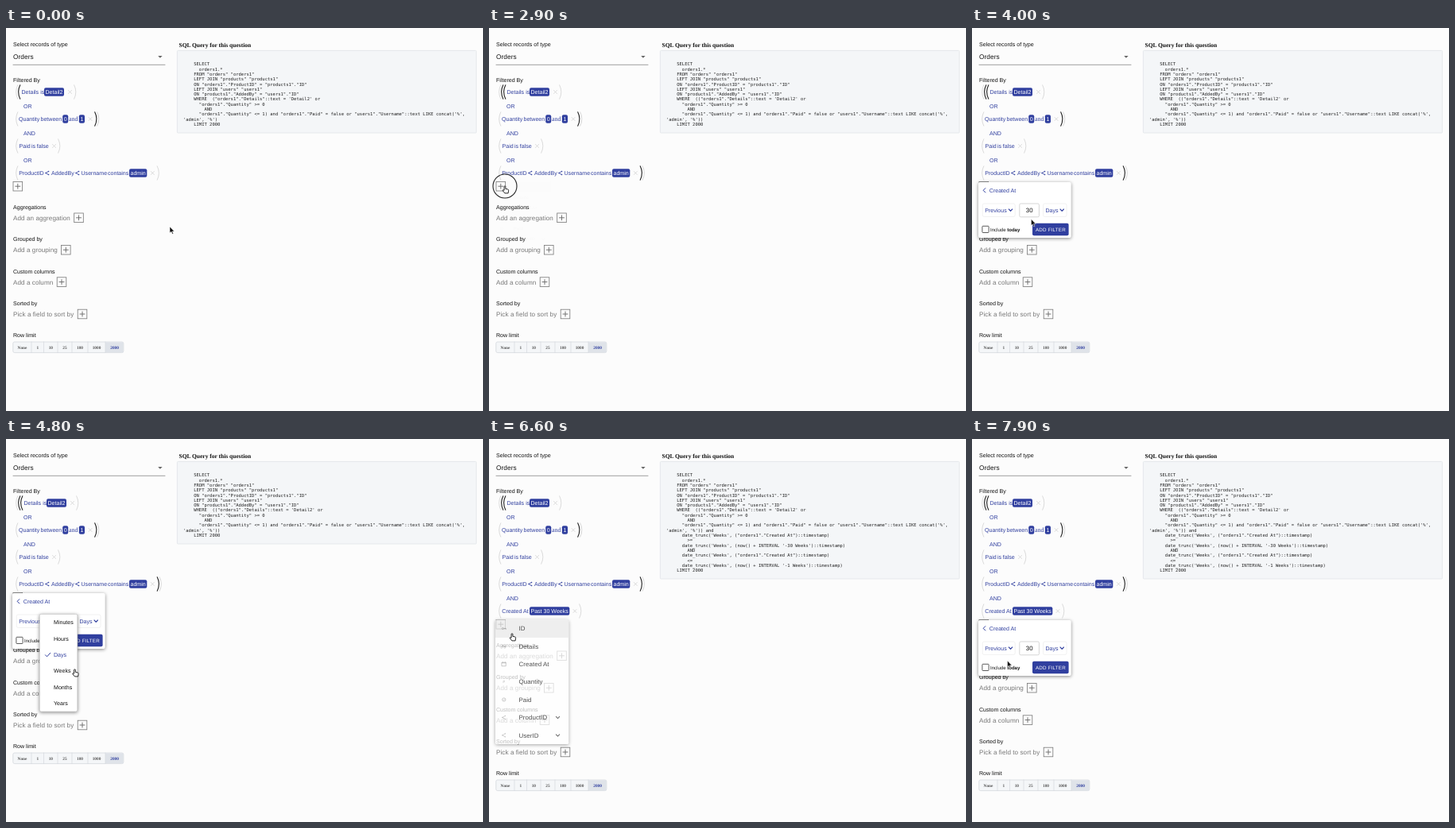
Recreate the animation shown at these times as an HTML page. Size 600 by 482 pixels, loop 8 s.

```html
<!DOCTYPE html>
<html lang="en">
<head>
<meta charset="utf-8">
<title>Query builder</title>
<style>
html, body { margin: 0; width: 100%; height: 100%; overflow: hidden; background: #fcfcfc; }
svg { display: block; width: 600px; height: 482px; }
text { font-family: "Liberation Sans", Arial, sans-serif; white-space: pre; text-rendering: geometricPrecision; }
.serif { font-family: "Liberation Serif", Times, serif; }
.mono { font-family: "DejaVu Sans Mono", monospace; }
.bold { font-weight: bold; }
.mid { text-anchor: middle; }
.body { letter-spacing: .0094em; }
.caps { letter-spacing: .03em; }
.paper { filter: drop-shadow(0 1.5px 2px #0007); }
.line { fill: none; stroke-linecap: round; stroke-linejoin: round; }
</style>
</head>
<body>
<svg id="stage" viewBox="0 0 600 482"></svg>
<script>
const LOOP = 8000, INDIGO = '#303f9f', INK = '#111', GREY = '#777', ROW = 23.15;
const stage = document.getElementById('stage');

// Moments at which the interface changes
const AT = { open: 1000, close: 2200, menu: 2900, panel: 3680, units: 4420, weeks: 5050,
  add: 5720, row: 5850, menu2: 6480, panel2: 7330 };

// Pointer stops: time, x, y
const PATH = [[0, 206, 250], [200, 206, 250], [850, 17, 79], [1300, 17, 79], [1900, 176, 184],
  [2050, 190, 183], [2350, 190, 183], [2780, 20, 199], [3000, 20, 199], [3400, 51, 245],
  [3550, 53, 249], [3800, 53, 249], [4250, 104, 229], [4480, 104, 229], [4800, 86.5, 290],
  [5100, 86.5, 290], [5500, 99.5, 254.5], [5800, 99.5, 254.5], [6350, 15, 232],
  [6500, 15, 232], [6600, 29, 245], [7050, 44.5, 279], [LOOP, 44.5, 279]];
const HAND = [[700, 1400], [1800, 2350], [2700, 3850], [4150, 5150], [5400, 5900], [6250, 7450]];
// Click rings: time, radius
const CLICKS = [[980, 8], [2130, 15], [2870, 15], [3600, 15], [4350, 15], [4980, 15], [5540, 15], [6380, 15], [7230, 15]];

const within = (t, list) => list.some(([a, b]) => t >= a && t < b);
const easeOut = p => 1 - (1 - Math.min(1, Math.max(0, p))) ** 2;

function pointer(t) {
  const i = Math.max(1, PATH.findIndex(p => p[0] >= t));
  const [a, x, y] = PATH[i - 1], [b, u, v] = PATH[i];
  let p = Math.max(0, (t - a) / (b - a));
  p = p * p * (3 - 2 * p);
  return [x + (u - x) * p, y + (v - y) * p];
}

// Drawing helpers; text is placed by its middle height
const esc = s => s.replace(/&/g, '&amp;').replace(/</g, '&lt;');
const text = (x, y, s, size = 7.07, fill = INK, cls = '') =>
  `<text x="${x}" y="${y + size * .36}" font-size="${size}" fill="${fill}" class="${cls}">${esc(s)}</text>`;
const rect = (x, y, w, h, fill, stroke = 'none', r = 0, cls = '') =>
  `<rect x="${x}" y="${y}" width="${w}" height="${h}" rx="${r}" fill="${fill}" stroke="${stroke}" stroke-width=".8" class="${cls}"/>`;
const line = (d, stroke, w = 1) => `<path class="line" d="${d}" stroke="${stroke}" stroke-width="${w}"/>`;
const paren = (x, y, dir, dark) =>
  line(`M${x + 1.3 * dir} ${y - 8.7}q${-4.4 * dir} 8.7 0 17.4`, dark ? '#222' : '#ccc', dark ? 1.1 : .7);
const cross = (x, y) => line(`M${x - 2} ${y - 2}l4 4m0-4l-4 4`, '#ccc', .7);
const plus = (x, y) => rect(x - 5.8, y - 5.8, 11.6, 11.6, 'none', GREY) +
  line(`M${x - 3} ${y}h6m-3-3v6`, '#666', .9);
const chip = (x, y, w, s) => rect(x, y - 5.3, w, 10.6, INDIGO, 'none', 2) +
  text(x + w / 2, y, s, 7.07, '#fff', 'mid');
const share = (x, y, color, w = .8) => line(`M${x + 4} ${y - 2}l-3.5 2l3.5 2`, color, w) +
  [[4, -2], [.5, 0], [4, 2]].map(([a, b]) => `<circle cx="${x + a}" cy="${y + b}" r="${w}" fill="${color}"/>`).join('');
const down = (x, y, color = INK) => line(`M${x - 2.2} ${y - 1}l2.2 2.3l2.2-2.3`, color, 1.1);
const blue = (x, y, s) => text(x, y, s, 7.07, INDIGO);

function filters(t) {
  const s = t >= AT.open ? 3 : 0, closed = t >= AT.close, added = t >= AT.row;
  let out = paren(13.5, 80.5, 1) + paren(16.5, 80.5, 1, true) + (s ? paren(19.5, 80.5, 1, true) : '') +
    blue(19.5 + s, 80.5, 'Details') + blue(43.3 + s, 80.5, 'is') + chip(48 + s, 80.5, 25, 'Detail2') +
    cross(80.5 + s, 80.5) + paren(87 + s, 80.5, -1);
  out += paren(13.5, 114.5, 1) + blue(16, 114.5, 'Quantity') + blue(43.5, 114.5, 'between') +
    chip(71.2, 114.5, 7, '0') + text(79, 114.5, 'and', 8, INDIGO, 'serif') + chip(91.8, 114.5, 7.2, '1') +
    cross(106, 114.5) + paren(113, 114.5, -1, true) + paren(116, 114.5, -1);
  out += paren(13.5, 148.5, 1) + blue(16.5, 148.5, 'Paid') + blue(32, 148.5, 'is') +
    blue(38.7, 148.5, 'false') + cross(60.5, 148.5) + paren(67, 148.5, -1);
  out += paren(13.5, 182.5, 1) + blue(16.3, 182.5, 'ProductID') + share(49.5, 182.5, INDIGO) +
    blue(57, 182.5, 'AddedBy') + share(87.5, 182.5, INDIGO) + blue(94.5, 182.5, 'Username') +
    blue(128, 182.5, 'contains') + chip(155, 182.5, 22.3, 'admin') + cross(184.3, 182.5) +
    (closed ? paren(191.5, 182.5, -1, true) : '') + paren(closed ? 194.5 : 191.5, 182.5, -1);
  out += ['OR', 'AND', 'OR'].map((w, i) => blue(22, 98.5 + 34 * i, w)).join('');
  if (added) out += blue(22, 200.5, 'AND') + paren(13.5, 216.5, 1) + blue(16.3, 216.5, 'Created At') +
    chip(51, 216.5, 50.3, 'Past 30 Weeks') + cross(108, 216.5) + paren(115, 216.5, -1);
  return out;
}

function sections() {
  const list = [['Aggregations', 'Add an aggregation', 91.5], ['Grouped by', 'Add a grouping', 75.3],
    ['Custom columns', 'Add a column', 70], ['Sorted by', 'Pick a field to sort by', 96]];
  let out = plus(14.8, 199.2) + list.map(([head, hint, x], i) => {
    const y = 225.2 + 40.4 * i;
    return text(9, y, head) + text(9, y + 13.6, hint, 8.08, GREY, 'body') + plus(x, y + 13.6);
  }).join('');
  out += text(9, 386.6, 'Row limit') + rect(8.8, 395, 139, 13.6, '#f4f6f8', '#d5d9de', 2) +
    rect(125, 395.4, 22.4, 12.8, '#dfe3e9');
  out += [32, 47.5, 65, 83, 103, 125].map(x => line(`M${x} 395v13.6`, '#d5d9de', .7)).join('');
  const mids = [20.5, 39.8, 56.3, 74, 93, 114, 136.6];
  return out + ['None', '1', '10', '25', '100', '1000', '2000'].map((s, i) =>
    text(mids[i], 401.8, s, 5.3, i === 6 ? INDIGO : '#555', 'serif bold mid')).join('');
}

function sql(t) {
  const added = t >= AT.row, end = t >= AT.close ? "'admin', '%'))" : "'admin', '%')";
  const range = (op, n) => [`      date_trunc('Weeks', ("orders1"."Created At")::timestamp)`, `        ${op}`,
    `      date_trunc('Weeks', (now() + INTERVAL '-${n} Weeks')::timestamp)`];
  const lines = ['    SELECT', '      orders1.*', '    FROM "orders" "orders1"',
    '    LEFT JOIN "products" "products1"', '    ON "orders1"."ProductID" = "products1"."ID"',
    '    LEFT JOIN "users" "users1"', '    ON "products1"."AddedBy" = "users1"."ID"',
    `    WHERE  ${t >= AT.open ? '((' : '('}"orders1"."Details"::text = 'Detail2' or`,
    '      "orders1"."Quantity" >= 0', '        AND',
    `      "orders1"."Quantity" <= 1) and "orders1"."Paid" = false or "users1"."Username"::text LIKE concat('%',`,
    ...(added ? [end + ' and', ...range('>=', 30), '        AND', ...range('<=', 1)] : [end]),
    '    LIMIT 2000'];
  return text(217.5, 21, 'SQL Query for this question', 7.5, INK, 'serif bold') +
    rect(215.4, 28.4, 376.2, added ? 147.6 : 103.6, '#f4f6f8', '#e0e4e8', 1) +
    lines.map((s, i) => text(223, 45.3 + 6.31 * i, s, 5.51, '#222', 'mono')).join('');
}

function menuIcon(i, y) {
  const c = '#999';
  return [
    `<circle cx="17.5" cy="${y}" r="1.1" fill="none" stroke="${c}" stroke-width=".8"/>` + line(`M18.7 ${y}h3v1`, c, .8),
    text(16, y, 'Aa', 4.6, c),
    line(`M16.5 ${y - 2}h5v4.6h-5zM16.5 ${y - 1.5}h5m-4-1.2v.6m3-.6v.6`, c, .7),
    text(17.5, y, '#', 5, c),
    `<circle cx="19" cy="${y}" r="2.2" fill="none" stroke="${c}" stroke-width=".7"/>` + line(`M18 ${y}l.8.8l1.4-1.5`, c, .5),
    share(16.5, y, c, .6), share(16.5, y, c, .6)][i];
}

function menu(t, start, dy) {
  const p = (t - start) / 250, q = easeOut(p / .666), top = 193.6 + dy;
  const [x, y] = pointer(t - 100), hot = x > 8 && x < 102 ? Math.floor((y - top) / ROW) : -1;
  const names = ['ID', 'Details', 'Created At', 'Quantity', 'Paid', 'ProductID', 'UserID'];
  const body = rect(8, top, 94, 161.8, '#fff', 'none', 2, 'paper') +
    names.map((s, i) => {
      const mid = top + 11.2 + ROW * i;
      return (i === hot ? rect(8, top + ROW * i, 94, ROW, '#e9e9e9') : '') + menuIcon(i, mid) +
        text(38, mid, s, 8.08, INK, 'body') + (i > 4 ? down(88, mid, '#444') : '');
    }).join('');
  const scale = `translate(8 ${top}) scale(${.75 + .25 * q} ${.5625 + .4375 * q}) translate(-8 ${-top})`;
  return `<g opacity="${easeOut(p)}" transform="${scale}">${body}</g>`;
}

function panel(dy, weeks, opacity = 1) {
  const w = weeks ? 5.3 : 0;
  return `<g opacity="${opacity}" transform="translate(0 ${dy})">` +
    rect(8, 194, 116.7 + w, 70, '#fff', 'none', 2, 'paper') +
    line('M16.8 201.6l-2.6 2.7l2.6 2.7', INDIGO) + blue(21.8, 204.4, 'Created At') +
    rect(13.2, 221, 41, 16.4, '#fff', '#eee', 2) + blue(16.2, 229, 'Previous') + down(48.5, 229, INDIGO) +
    rect(59.8, 221, 24.6, 16.8, '#fff', '#ccc', 1.5) + text(72.2, 229.5, '30', 7.8, INK, 'mid') +
    rect(89.5, 221, 29.5 + w, 16.4, '#fff', '#eee', 2) + blue(92.5, 229, weeks ? 'Weeks' : 'Days') +
    down(113.2 + w, 229, INDIGO) +
    rect(12.9, 249.3, 8.2, 8.2, '#fff', '#333', .8) + text(23, 253.5, 'Include', 6.06) +
    text(44.2, 253.5, weeks ? 'this week' : 'today', 6.06, INK, 'bold') +
    rect(76 + w, 245.8, 45.6, 15.4, INDIGO, 'none', 2) +
    text(80 + w, 253.5, 'ADD FILTER', 6.25, '#fff', 'caps') + '</g>';
}

function units() {
  return rect(42.3, 220.4, 47.5, 122.6, '#fff', '#ccc', 2, 'paper') +
    ['Minutes', 'Hours', 'Days', 'Weeks', 'Months', 'Years'].map((s, i) =>
      text(60, 230.9 + 20.35 * i, s, 7.07, i === 2 ? INDIGO : INK)).join('') +
    line('M49.5 271.8l2 2.1l4.2-4.6', INDIGO);
}

function cursor(t) {
  const [x, y] = pointer(t);
  const shape = within(t, HAND)
    ? '<path d="M-.9 5.2V.7a.9.9 0 0 1 1.8 0V3.4l2.8.6q1 .3 .9 1.4l-.5 3.5h-4.2l-2.6-3.2q-.4-1 .6-.9z" fill="#fff" stroke="#111" stroke-width=".9"/>'
    : '<path d="M0 0V8l1.9-1.7 1.3 3 1.3-.6-1.3-2.8h2.5z" fill="#111" stroke="#fff" stroke-width=".5"/>';
  const click = CLICKS.find(([a]) => t >= a && t < a + 120);
  const ring = click ? `<circle r="${click[1]}" fill="none" stroke="#222" stroke-width="1.1"/>` : '';
  return `<g transform="translate(${x} ${y})">${ring}${shape}</g>`;
}

function popups(t) {
  if (t < AT.menu) return '';
  if (t < AT.panel) return menu(t, AT.menu, 0);
  if (t < AT.row) return panel(0, t >= AT.weeks, 1 - Math.max(0, (t - AT.add) / (AT.row - AT.add))) +
    (t >= AT.units && t < AT.weeks ? units() : '');
  if (t < AT.menu2) return '';
  return t < AT.panel2 ? menu(t, AT.menu2, 34) : panel(34, false);
}

function scene(t) {
  return rect(0, 0, 600, 482, '#fcfcfc') +
    text(9, 20.3, 'Select records of type', 7.1) + text(9, 36, 'Orders', 8.25, INK, 'body') +
    line('M9 46.3h191', '#888', .8) + '<path d="M191.2 35h5.4l-2.7 2.8z" fill="#666"/>' +
    text(9, 65.3, 'Filtered By', 7.1) + filters(t) +
    `<g transform="translate(0 ${t >= AT.row ? 34 : 0})">${sections()}</g>` +
    sql(t) + popups(t) + cursor(t);
}

const begin = performance.now();
function tick() {
  stage.innerHTML = scene((performance.now() - begin) % LOOP);
  requestAnimationFrame(tick);
}
tick();
</script>
</body>
</html>
```
